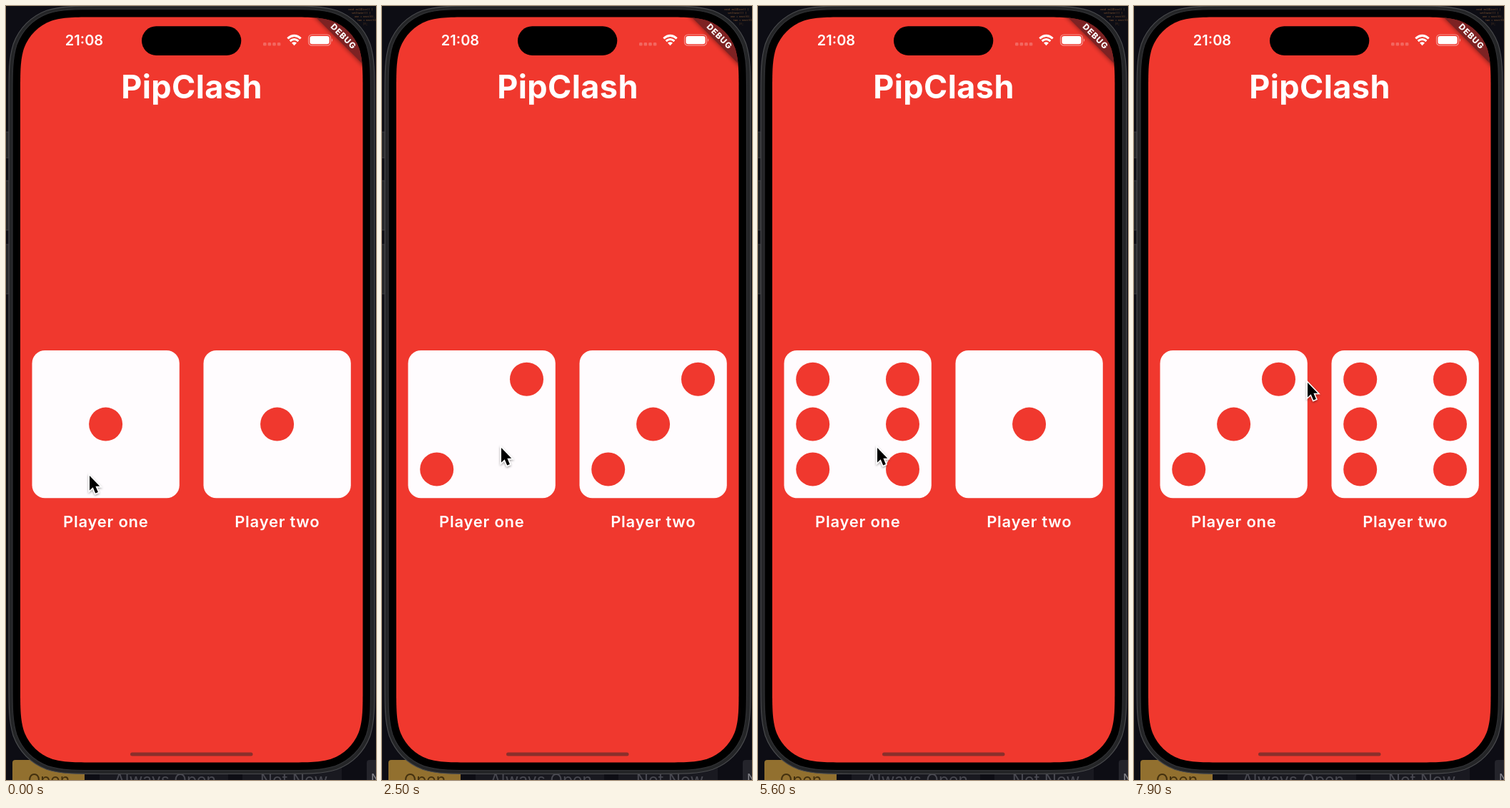
An HTML page that plays this animation: 518x1081 px, repeating every 8 s.

```html
<!DOCTYPE html>
<html lang="en">
<head>
<meta charset="utf-8">
<title>Dice game</title>
<style>
  html, body { margin: 0; width: 100%; height: 100%; overflow: hidden; background: #0d0d14; }
  svg { display: block; width: 518px; height: 1081px; }
  text { font-family: Inter, "Noto Sans", sans-serif; font-weight: 600; fill: #fff; }
  .mid { text-anchor: middle; }
  .label { font-size: 22px; letter-spacing: .75px; }
  .behind text { font-size: 23px; font-weight: 400; fill: #484850; }
  .code text { font: 3.4px "Noto Sans Mono", monospace; fill: #8a5a32; }
  .pips circle { fill: #f0382e; }
</style>
</head>
<body>
<svg viewBox="0 0 518 1081">
  <defs>
    <clipPath id="screen"><path id="glass"/></clipPath>
    <filter id="blur" x="-30%" y="-100%" width="160%" height="300%"><feGaussianBlur stdDeviation="3.2"/></filter>
    <filter id="drop" x="-50%" y="-50%" width="200%" height="200%">
      <feDropShadow dx="0" dy="1.5" stdDeviation="1.4" flood-opacity=".4"/>
    </filter>
  </defs>

  <!-- desktop behind the phone -->
  <rect width="518" height="1081" fill="#0d0d14"/>
  <g class="code">
    <text x="479" y="6">void rollDice() {</text>
    <text x="484" y="11">setState(() {</text>
    <text x="488" y="16">one = next(6);</text>
    <text x="492" y="21">two = next(6);</text>
    <text x="500" y="26">});</text>
  </g>
  <g class="behind">
    <rect x="9" y="1053" width="101" height="40" rx="4" fill="#92702f"/>
    <rect x="131" y="1053" width="180" height="40" rx="4" fill="#191920"/>
    <rect x="331" y="1053" width="139" height="40" rx="4" fill="#191920"/>
    <rect x="505" y="1053" width="40" height="40" rx="4" fill="#24242b"/>
    <text class="mid" x="60" y="1089" style="fill:#44310f">Open</text>
    <text class="mid" x="222.5" y="1089">Always Open</text>
    <text class="mid" x="403" y="1089">Not Now</text>
    <text x="511" y="1085" style="font-size:17px;fill:#85858b">N</text>
  </g>

  <!-- phone body -->
  <g fill="#242528" stroke="#3c3d40">
    <rect x="-1" y="176" width="5" height="36"/>
    <rect x="-1" y="244" width="5" height="69"/>
    <rect x="-1" y="333" width="5" height="69"/>
  </g>
  <path id="frame" fill="#242527" stroke="#48494c" stroke-width="1.2"/>
  <path id="bezel" stroke="#303134" stroke-width="1.2"/>

  <g clip-path="url(#screen)">
    <rect x="20" y="15" width="480" height="1042" fill="#f0382e"/>
    <g transform="translate(499.5 15.5) rotate(45)">
      <rect x="-60" y="16" width="120" height="31" opacity=".5" filter="url(#blur)"/>
      <rect x="-47" y="16" width="94" height="30.5" fill="#7d2223"/>
      <text class="mid" x="0" y="42.3" style="font-size:11.6px;font-weight:800;letter-spacing:.9px">DEBUG</text>
    </g>
  </g>
  <rect x="190" y="28.3" width="139.3" height="40.6" rx="20.3"/>
  <rect x="174" y="1042.4" width="171.5" height="5" rx="2.5" fill="#8a2f2b"/>

  <!-- status bar -->
  <text class="mid" x="109.5" y="55" style="font-size:20px">21:08</text>
  <g fill="#fff" fill-opacity=".24">
    <rect x="360" y="51" width="4.6" height="4.6" rx="1.4"/>
    <rect x="366.6" y="51" width="4.6" height="4.6" rx="1.4"/>
    <rect x="373.2" y="51" width="4.6" height="4.6" rx="1.4"/>
    <rect x="379.8" y="51" width="4.6" height="4.6" rx="1.4"/>
  </g>
  <g fill="none" stroke="#fff" stroke-width="3">
    <path d="M394.3 45.4Q403.5 37.4 412.7 45.4"/>
    <path d="M397.6 49Q403.5 44 409.4 49"/>
  </g>
  <path d="M400 51.6Q403.5 48.8 407 51.6L403.5 55.2Z" fill="#fff"/>
  <rect x="423.5" y="40" width="31" height="15.2" rx="4.8" fill="none" stroke="#fff" stroke-opacity=".45" stroke-width="1.2"/>
  <rect x="425.4" y="41.9" width="27.2" height="11.4" rx="3.2" fill="#fff"/>
  <path d="M456 45.2Q458.4 47.6 456 50Z" fill="#fff" fill-opacity=".5"/>

  <text class="mid" x="260" y="129.3" style="font-size:45px;font-weight:700;letter-spacing:.4px">PipClash</text>

  <g id="dice"></g>
  <text class="mid label" x="139.8" y="728">Player one</text>
  <text class="mid label" x="379.8" y="728">Player two</text>

  <g id="cursor" filter="url(#drop)">
    <path d="M0 0V20.4L4.7 16.2L8.2 24.5L11.9 22.9L8.4 14.8H14.3Z" stroke="#fff" stroke-width="3" paint-order="stroke"/>
  </g>
</svg>
<script>
  const LOOP = 8000;
  const NS = "http://www.w3.org/2000/svg";
  // [start time, player one, player two]
  const rolls = [
    [0, 1, 1], [600, 2, 2], [1700, 2, 3], [2800, 1, 6],
    [3850, 2, 5], [5550, 6, 1], [7150, 3, 6]
  ];
  // [start, end, x, y]
  const moves = [[100, 500, 167, 617], [7350, 7800, 243, 526]];
  const home = [117, 656];

  const add = (parent, tag, attrs) => {
    const el = parent.appendChild(document.createElementNS(NS, tag));
    for (const key in attrs) el.setAttribute(key, attrs[key]);
    return el;
  };

  // Rectangle whose corners ease into the straight sides
  function smoothRect(id, x, y, w, h, r) {
    const corner = (cx, cy, sx, sy, flip) => {
      const pts = [
        [0, 1.53], [0, 1.09], [0, .87], [.075, .63], [.17, .37],
        [.37, .17], [.63, .075], [.87, 0], [1.09, 0], [1.53, 0]
      ].map(([a, b]) => `${cx + sx * a * r} ${cy + sy * b * r}`);
      if (flip) pts.reverse();
      return `${pts[0]}C${pts.slice(1).join(" ")}`;
    };
    const d = [
      corner(x, y, 1, 1, false), corner(x + w, y, -1, 1, true),
      corner(x + w, y + h, -1, -1, false), corner(x, y + h, 1, -1, true)
    ].join("L");
    document.getElementById(id).setAttribute("d", `M${d}Z`);
  }
  smoothRect("frame", 4, 0, 512, 1072.5, 84);
  smoothRect("bezel", 9, 4.5, 501.5, 1063, 79);
  smoothRect("glass", 20, 15.5, 479.5, 1041, 69);

  // column, row and the faces that show the pip
  const pips = [
    [0, 0, "456"], [2, 0, "23456"], [0, 1, "6"], [1, 1, "135"],
    [2, 1, "6"], [0, 2, "23456"], [2, 2, "456"]
  ];

  function makeDie(x) {
    const g = add(document.getElementById("dice"), "g", { transform: `translate(${x} 481)`, class: "pips" });
    add(g, "rect", { width: 206.3, height: 206.3, rx: 18, fill: "#fffcfe" });
    const dots = pips.map(([col, row, faces]) => ({
      faces,
      el: add(g, "circle", { cx: 40.2 + col * 62.9, cy: 40.2 + row * 62.9, r: 23.5 })
    }));
    return face => dots.forEach(d =>
      d.el.setAttribute("visibility", d.faces.includes(face) ? "visible" : "hidden"));
  }

  const showOne = makeDie(36.5);
  const showTwo = makeDie(276.5);
  const cursor = document.getElementById("cursor");

  function cursorAt(t) {
    let [x, y] = home;
    for (const [start, end, toX, toY] of moves) {
      const p = Math.min(1, Math.max(0, (t - start) / (end - start)));
      const ease = p * p * (3 - 2 * p);
      x += (toX - x) * ease;
      y += (toY - y) * ease;
    }
    return [x, y];
  }

  function draw(now) {
    const t = now % LOOP;
    const [, one, two] = rolls.findLast(r => r[0] <= t);
    showOne(one);
    showTwo(two);
    cursor.setAttribute("transform", `translate(${cursorAt(t)})`);
  }

  const begin = performance.now();
  function tick() {
    draw(performance.now() - begin);
    requestAnimationFrame(tick);
  }
  tick();
</script>
</body>
</html>
```
